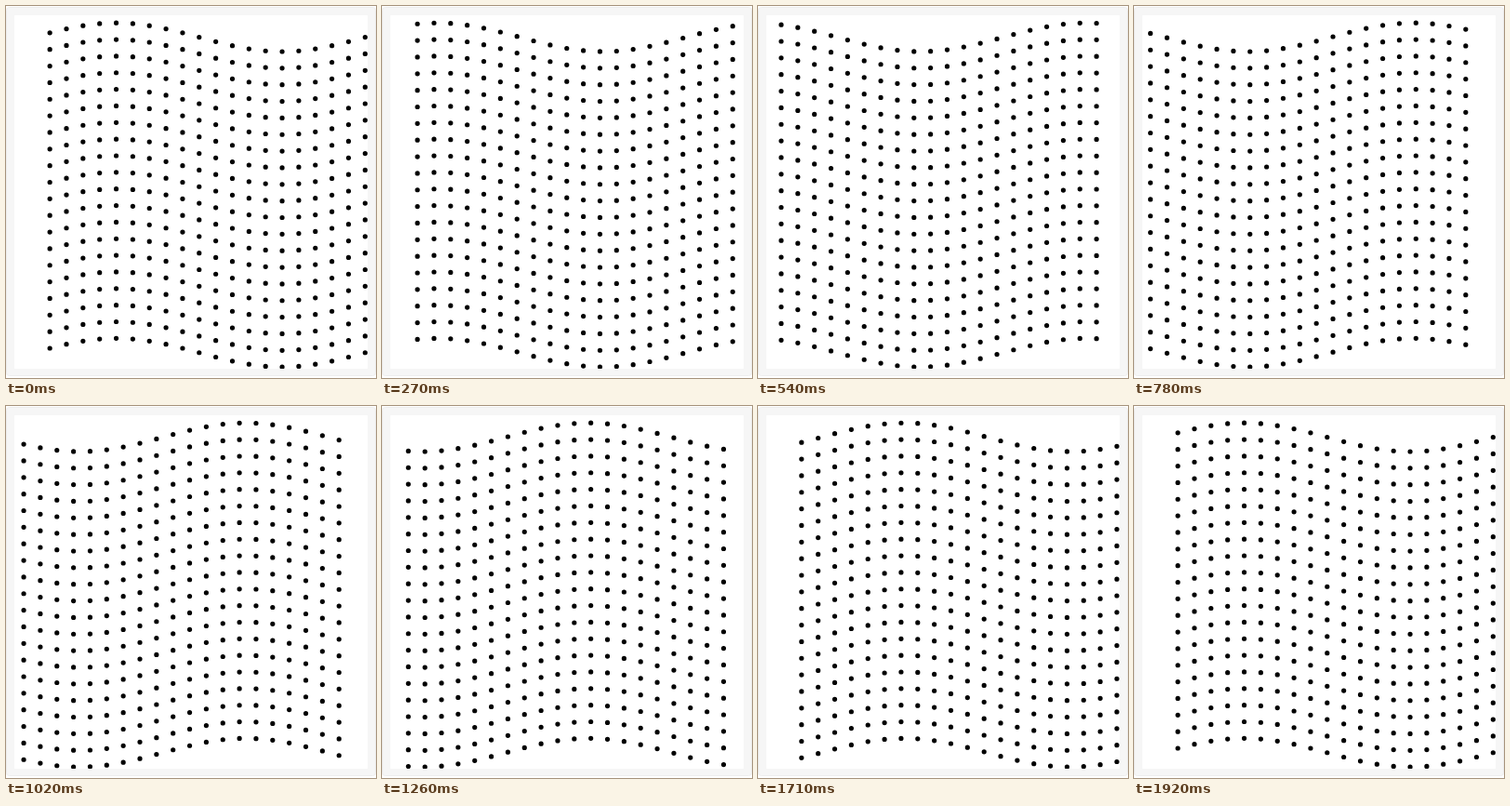
Animation of 398x400 px, one loop 1.95 s. Source, as an HTML page with a canvas:

```html
<!DOCTYPE html>
<html lang="en">
<head>
<meta charset="utf-8">
<title>Dot wave</title>
<style>
  html, body { margin: 0; width: 100%; height: 100%; overflow: hidden; background: #fff; }
  canvas { display: block; }
</style>
</head>
<body>
<canvas id="stage" width="398" height="400"></canvas>
<script>
const ctx = document.getElementById('stage').getContext('2d');
const COUNT = 20, GAP = 17.85, ORBIT = 15.4, DOT = 2.6;
const STEP = 30, LOOP = 1950, TURN = 64;
const CX = 32.5, CY = 33.6;

function drawPanel() {
  ctx.fillStyle = '#fff';
  ctx.fillRect(0, 0, 398, 400);
  ctx.beginPath();
  ctx.roundRect(0.5, 1.5, 397, 396, 3);
  ctx.fillStyle = '#f6f6f6';
  ctx.fill();
  ctx.strokeStyle = '#eee';
  ctx.stroke();
  ctx.fillStyle = '#fff';
  ctx.fillRect(9, 10, 380, 380);
}

// All dots share one horizontal swing; each column is a twentieth of a turn ahead vertically.
function drawDots(angle) {
  ctx.save();
  ctx.beginPath();
  ctx.rect(9, 10, 380, 380);
  ctx.clip();
  ctx.fillStyle = '#000';
  ctx.beginPath();
  for (let col = 0; col < COUNT; col++) {
    const x = CX + col * GAP + ORBIT * Math.cos(angle);
    const lift = ORBIT * Math.sin(angle + col * 2 * Math.PI / COUNT);
    for (let row = 0; row < COUNT; row++) {
      const y = CY + row * GAP - lift;
      ctx.moveTo(x + DOT, y);
      ctx.arc(x, y, DOT, 0, 2 * Math.PI);
    }
  }
  ctx.fill();
  ctx.restore();
}

function render() {
  const step = Math.floor(performance.now() % LOOP / STEP);
  drawPanel();
  drawDots(2 * Math.PI * (step / TURN + 1 / COUNT));
  requestAnimationFrame(render);
}
render();
</script>
</body>
</html>
```
